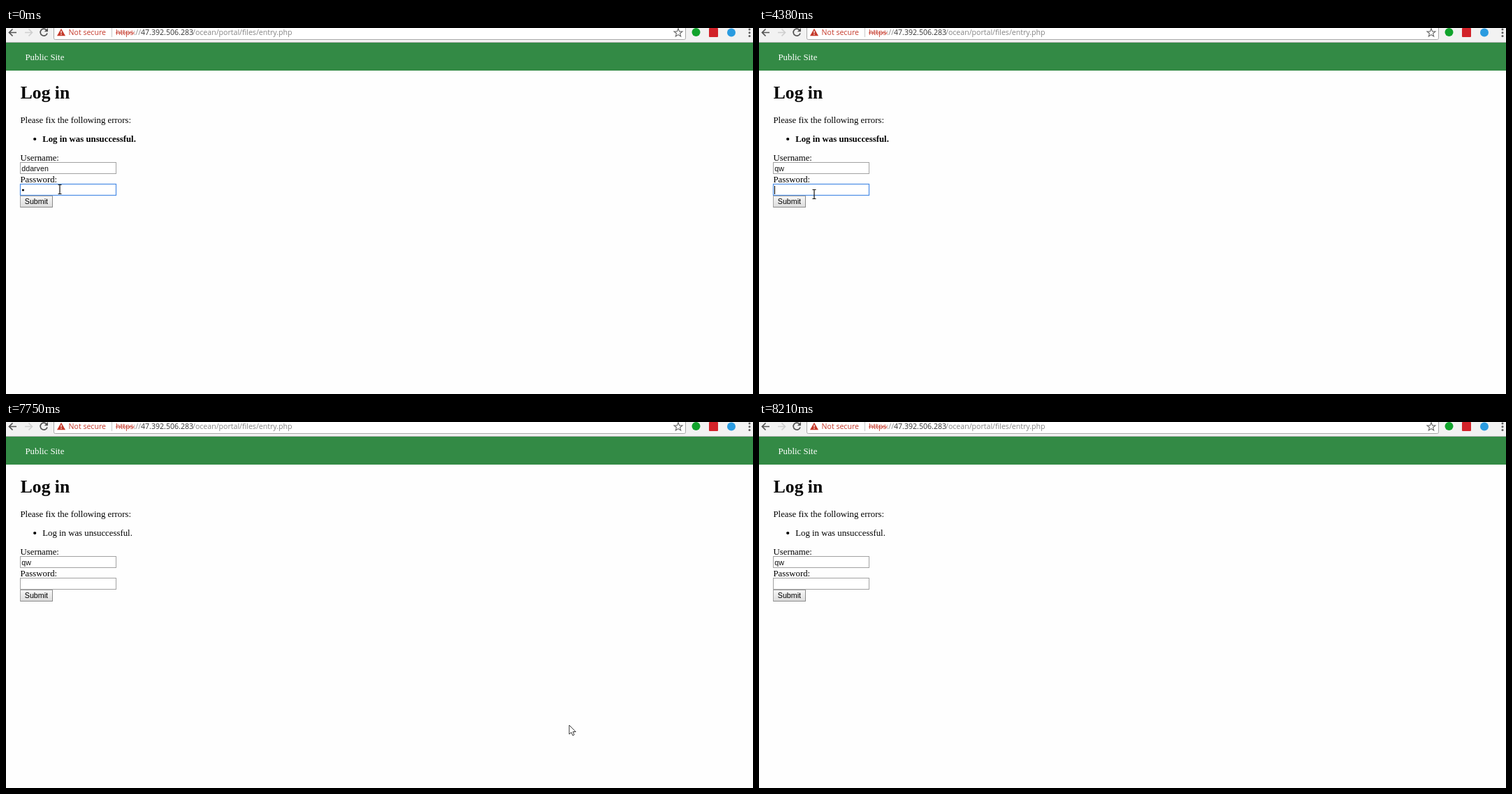
Animation, 1069 px wide and 524 px high, one loop 8.74 s. Source, as an HTML page:

```html
<!DOCTYPE html>
<html lang="en">
<head>
<meta charset="utf-8">
<title>Log in</title>
<style>
  html, body { margin: 0; width: 100%; height: 100%; overflow: hidden; background: #fefefe; }
  svg { display: block; width: 1069px; height: 524px; overflow: hidden; }
  text { white-space: pre; }
  .ui { font: 10.6px "Open Sans", "Noto Sans", sans-serif; }
  .page { font: 12.8px "Liberation Serif", "Times New Roman", serif; }
  .field { font: 10.67px "Liberation Sans", Arial, sans-serif; }
  .label { font: 8.7px "Open Sans", "Noto Sans CJK SC", "Noto Sans CJK", sans-serif; fill: #fff;
    text-anchor: middle; paint-order: stroke; stroke: rgba(25, 30, 20, .85); stroke-width: 1.8px; }
  .line { fill: none; }
  .box { fill: #fff; stroke: #a2a2a2; }
  .box.focus { stroke: #4f8fe6; stroke-width: 1.25; }
</style>
</head>
<body>
<svg viewBox="0 0 1069 524">
  <defs>
    <linearGradient id="face" x2="0" y2="1">
      <stop stop-color="#f7f7f7"/><stop offset="1" stop-color="#dcdcdc"/>
    </linearGradient>
    <linearGradient id="band">
      <stop stop-color="#bace28"/><stop offset=".6" stop-color="#bace38"/><stop offset="1" stop-color="#b2cc70"/>
    </linearGradient>
  </defs>

  <g id="desktop" visibility="hidden">
    <rect width="1069" height="524" fill="#e7e28e"/>
    <path d="M0 120Q130 85 330 108T626 60V0H1069V350Q840 380 640 350T160 385Q60 400 0 380Z" fill="#ebe49f"/>
    <rect y="21" width="1069" height="40" fill="url(#band)"/>
    <path d="M0 425Q160 448 330 430T640 415L850 360L1069 390V524H0Z" fill="#c9df7c"/>
    <path d="M0 468Q300 450 560 458T830 392Q960 370 1069 410V524H0Z" fill="#b2da55"/>
    <path d="M905 524Q950 430 1069 405V524Z" fill="#9dd43a"/>
    <path d="M845 40Q800 120 812 210T818 325Q850 240 868 130Z" fill="#cede66"/>
    <path d="M660 225Q610 245 600 285Q612 330 650 335Z" fill="#c3da64"/>
    <g id="leaves"></g>
    <rect x=".5" y="-6" width="625.5" height="491.5" rx="3" fill="rgba(255,255,230,.06)" stroke="#94926a" stroke-width="1.8"/>
    <g id="icons"></g>
  </g>

  <g id="window">
    <rect width="1069" height="524" fill="#fefefe"/>
    <rect width="1069" height="20" fill="#f2f2f2"/>
    <path d="M0 20.5H1069" stroke="#b9b9b9"/>
    <rect x="68.5" y="-8" width="904" height="24.5" rx="2" fill="#fff" stroke="#a9a9a9"/>
    <g class="line" stroke-width="1.7">
      <path d="M15 6.5H5M9.5 1.5L4.5 6.5L9.5 11.5" stroke="#555"/>
      <path d="M27 6.5H37M32.5 1.5L37.5 6.5L32.5 11.5" stroke="#cfcfcf"/>
      <g id="reload"><path d="M58.2 3.2A5 5 0 1 0 59 7.5" stroke="#555"/><path d="M60 0V5.2H54.8Z" fill="#555"/></g>
      <path id="stop" d="M50 2.5L58 10.5M58 2.5L50 10.5" stroke="#555"/>
    </g>
    <path d="M79 .8L85 11.2H73Z" fill="#c5392a"/>
    <path d="M79 4V7.6M79 8.6V10" stroke="#fff" stroke-width="1.2"/>
    <path d="M151.5 0V13" stroke="#c8c8c8"/>
    <g class="ui">
      <text x="89.5" y="10.3" fill="#c5392a">Not secure</text>
      <text x="157" y="10.3" fill="#c5392a">https</text>
      <text x="182.5" y="10.3" fill="#888">://</text>
      <text x="193" y="10.3" fill="#333">47.392.506.283</text>
      <text x="267" y="10.3" fill="#858585">/ocean/portal/files/entry.php</text>
    </g>
    <path d="M157 7H184" stroke="#c5392a"/>
    <path d="M962 .8L963.6 4.9L968 5.1L964.6 7.8L965.7 12L962 9.6L958.3 12L959.4 7.8L956 5.1L960.4 4.9Z"
      class="line" stroke="#666" stroke-width="1.1"/>
    <circle cx="987.5" cy="6" r="6" fill="#11a32c"/>
    <rect x="1006" y="0" width="13" height="13" rx="1" fill="#d2232a"/>
    <circle cx="1038" cy="6.5" r="6" fill="#2a9be0"/>
    <g fill="#5a5a5a"><circle cx="1064" cy="2" r="1.5"/><circle cx="1064" cy="6.7" r="1.5"/><circle cx="1064" cy="11.4" r="1.5"/></g>

    <rect y="21" width="1069" height="40" fill="#338a45"/>
    <g class="page">
      <text x="27.5" y="46" fill="#fff">Public Site</text>
      <text x="20.8" y="101" style="font-size:25.6px;font-weight:bold">Log in</text>
      <text x="20.5" y="136">Please fix the following errors:</text>
      <circle cx="41.2" cy="159" r="2.1"/>
      <text id="error" x="52.2" y="163">Log in was unsuccessful.</text>
      <text x="20.5" y="190">Username:</text>
      <text x="20.5" y="221">Password:</text>
    </g>
    <rect id="user" class="box" x="20.5" y="192.5" width="137" height="16"/>
    <rect id="pass" class="box" x="20.5" y="223.5" width="137" height="16"/>
    <rect id="mark" x="22" y="195" width="39" height="12" fill="#3390ff"/>
    <text id="name" class="field" x="22.3" y="204.6"></text>
    <circle id="dot" cx="24.4" cy="232" r="1.6"/>
    <path id="caret" stroke="#000"/>
    <rect id="button" x="20.5" y="240.5" width="46" height="16" fill="url(#face)" stroke="#a3a3a3"/>
    <path d="M20.5 256.5H66.5V240.5" class="line" stroke="#8a8a8a"/>
    <text class="field" x="26.8" y="252.3">Submit</text>
  </g>

  <path id="arrow" d="M0 0V13L3 10.3L5 14.8L7.2 13.8L5.3 9.5H9.3Z" fill="#fff" stroke="#222" stroke-width=".9"/>
  <path id="beam" d="M-2.5 -6.5H-.6L0 -6L.6 -6.5H2.5M0 -6V6M-2.5 6.5H-.6L0 6L.6 6.5H2.5" class="line" stroke="#111" stroke-width="1.2"/>
</svg>

<script>
const LOOP = 8740;
const $ = id => document.getElementById(id);
const show = (id, on) => $(id).setAttribute('visibility', on ? 'visible' : 'hidden');

// --- Wallpaper leaves: a midrib with a half-width on each side ---
function leaf(top, bottom, rib, left, right, fill) {
  const at = u => top + u * (bottom - top);
  const edge = (u, side) => rib(u) + (side < 0 ? -left(u) : right(u));
  const a = [], b = [];
  for (let i = 0; i <= 60; i++) {
    const u = i / 60, tooth = i % 4 * 1.5;
    a.push(`${edge(u, -1) - tooth} ${at(u)}`);
    b.unshift(`${edge(u, 1) + tooth} ${at(u)}`);
  }
  let out = `<path d="M${a.concat(b).join('L')}Z" fill="${fill}" stroke="#acd93c" stroke-width="4"/>`;
  for (let u = 0.1; u < 0.92; u += 0.042) {
    for (const side of [-1, 1]) {
      const end = Math.min(1, u + 0.12);
      const x0 = rib(u), x1 = x0 + (edge(end, side) - x0) * 0.78;
      const curve = `M${x0} ${at(u)}Q${(x0 + x1) / 2 + side * 12} ${at(u) - 2} ${x1} ${at(end)}`;
      const back = `Q${(x0 + x1) / 2} ${at(u) + 14} ${x0} ${at(u) + 13}Z`;
      out += `<path d="${curve}${back}" fill="#3f8a10" opacity="${0.12 + 0.5 * u}"/>
        <path d="${curve}" class="line" stroke="#a2d03c" stroke-width="1.6"/>`;
    }
  }
  const spine = Array.from({length: 21}, (_, i) => `${rib(i / 20)} ${at(i / 20)}`);
  return out + `<path d="M${spine.join('L')}" class="line" stroke="#b5dc5c" stroke-width="3"/>`;
}

$('leaves').innerHTML =
  leaf(0, 530, u => 729 + 72 * u ** 3, u => 32 * (1 - u) + 88 * Math.sin(Math.PI * u * u), u => 47 - 40 * u ** 3, '#7fbf1c') +
  leaf(-6, 475, u => 908 + 12 * Math.sin(Math.PI * u) - 8 * u,
    u => (52 + 28 * u) * Math.sqrt(1 - u ** 8), u => (95 - 55 * u) * Math.sqrt(1 - u ** 6), '#84c41e');

// --- Desktop icons: column, row, kind, colour, label ---
const ICONS = `0,0,s,#6b7c90,Delvo x32|0,1,s,#f0773a,Doc Viewer|0,2,c,#f08a3c,文件助理|0,3,s,#5a3f86,notch
0,4,s,#2489d8,Video Set/Control...|0,5,c,#2aa6e6,Distant/Traveler|0,6,c,#463f78,horizon|0,7,c,#4fb84a,云朵浏览器
1,0,s,#8f9aa5,scheme|1,1,s,#2f8ae6,Tunelo|1,2,c,#f4f4ee,Plaza|1,3,c,#a5d65a,chitter
1,4,c,#2d2d33,闲聊室|1,5,c,#d98634,scripto|1,6,s,#dd7d6c,Dev Shell|1,7,s,#3fb6c8,software
2,0,s,#5fae4c,电脑安全卫士|2,1,c,#e0574a,Meadow/Window|2,2,s,#3a5580,Guest PC/EmulateBox|2,3,s,#ee6a40,ProbeTool...
2,4,s,#ea3f42,每日双语词/典|2,5,b,#e9f1f3,Recycle Bin|2,6,t,#5560b8,remoto|2,7,t,#d9dcdc,ScreenRec
3,0,s,#c25a5a,Nova2_7|3,1,s,#2478c4,Simple Script/Editor
5,2,d,#ee7a32,Garden/Layout Over...|6,2,d,#6cbf3a,answer|7,2,f,#ee8a5a,51700|8,2,f,#ee8a5a,51800
9,2,d,#78b83c,project/draft...|10,2,d,#78b83c,lab exercise/group list|11,2,f,#f8f8ee,Samples|12,2,f,#55564a,before 2018/spring
13,2,d,#2f74c0,Resume/Copy|5,3,d,#ee7a32,ResumeCop...|6,3,d,#78b83c,note|7,3,f,#f8f8ee,course notes
9,3,f,#a58a5c,Talks|11,3,f,#ecd98a,FinalProject`;

const SHAPES = {
  s: c => `<rect x="-15.5" y="-16" width="31" height="31" rx="4" fill="${c}"/>`,
  c: c => `<circle r="15.5" fill="${c}"/>`,
  b: c => `<path d="M-11 -12L0 -15L12 -11L8 14L-7 15Z" fill="${c}" stroke="#9fb4ba"/>`,
  t: c => `<rect x="-15" y="-12" width="30" height="20" fill="${c}" stroke="#555"/><path d="M-7 13H7M0 8V13" stroke="#555" stroke-width="2"/>`,
  d: c => `<path d="M-12 -16H8L13 -11V15H-12Z" fill="#fbfbf4" stroke="#b9b9a5"/><rect x="-15" y="-14" width="17" height="16" fill="${c}"/>`,
  f: c => `<path d="M-7 -12H3V14L-7 11Z" fill="#efe2ab"/><path d="M-3 -10H10V11L3 14V-8Z" fill="#f9f4d8"/><rect x="-4" y="-7" width="7" height="16" fill="${c}"/>`
};
const badge = '<path d="M-15 5H-6V14H-15Z" fill="#fff"/><path d="M-13 12.5L-8 7.5M-11.5 7H-7.6V11" class="line" stroke="#2b6fb5" stroke-width="1.5"/>';

$('icons').innerHTML = ICONS.split(/[|\n]/).map(row => {
  const [col, line, kind, colour, label] = row.split(',');
  const lines = label.split('/').map((s, i) => `<text class="label" y="${28 + i * 12}">${s}</text>`).join('');
  return `<g transform="translate(${24.3 + col * 59.45} ${-9 + line * 71.3})">${SHAPES[kind](colour)}${+col < 4 && kind !== 'b' ? badge : ''}${lines}</g>`;
}).join('') + '<circle cx="33" cy="122" r="7.5" fill="#e8403a"/><text class="label" x="33" y="125" style="stroke:none;font-size:8px">39</text>';

// --- Pointer: time, x, y, shape ---
const POINTER = [
  [0, 77, 231, 'beam'], [520, 82, 238, 'beam'], [890, 92, 241, 'arrow'], [1020, 104, 241, 'arrow'],
  [1160, 109, 240, 'arrow'], [1970, 107, 231, 'beam'], [2100, 100, 216, 'beam'], [2250, 85, 203, 'beam'],
  [2400, 62, 202, 'beam'], [2550, 30, 202, 'beam'], [2700, 4, 203, 'beam'], [2850, 30, 212, 'beam'],
  [3000, 63, 218, 'beam'], [3150, 66, 218, 'beam'], [3420, 77, 222, 'beam'], [3550, 79, 224, 'beam'],
  [3830, 80, 230, 'beam'], [3970, 80, 235, 'beam'], [4100, 79, 238, 'beam'], [4970, 74, 240, 'arrow'],
  [5110, 68, 243, 'arrow'], [5250, 64, 244, 'arrow'], [5520, 95, 265, 'arrow'], [5660, 164, 307, 'arrow'],
  [5800, 140, 303, 'arrow'], [5950, 125, 298, 'arrow'], [7170, 150, 310, 'arrow'], [7310, 300, 345, 'arrow'],
  [7450, 500, 385, 'arrow'], [7600, 690, 415, 'arrow'], [7750, 806, 434, 'arrow'], [7900, 0, 0, '']
];

// --- Page: each step changes part of the state ---
const STEPS = [
  [0, {name: 'ddarven', focus: 'pass', dot: 1, bold: 1, alpha: 1, caret: '', load: 0, mark: 0, press: 0}],
  [890, {caret: 'M26.5 226V238'}], [1430, {caret: ''}], [1580, {load: 1}],
  [2100, {load: 0, dot: 0, focus: ''}], [2400, {focus: 'user'}],
  [2550, {mark: 31}], [2700, {mark: 39}],
  [3420, {mark: 0, name: 'qw', caret: 'M36.5 196V207'}],
  [3830, {caret: ''}], [4100, {focus: 'pass', caret: 'M22.5 226V238'}],
  [4660, {dot: 1, caret: 'M26.5 226V238'}],
  [4970, {caret: ''}], [5250, {focus: '', press: 1}], [5520, {press: 0}],
  [6100, {load: 1}], [6650, {load: 0, dot: 0, bold: 0}],
  [7900, {alpha: 0.56}], [8060, {alpha: 0.42}], [8210, {alpha: 1}]
];

function draw(t) {
  const s = Object.assign({}, ...STEPS.filter(step => step[0] <= t).map(step => step[1]));
  const [, x, y, shape] = POINTER.filter(step => step[0] <= t).pop();

  $('window').setAttribute('opacity', s.alpha);
  show('desktop', s.alpha < 1);
  show('reload', !s.load);
  show('stop', s.load);
  show('dot', s.dot);
  for (const id of ['user', 'pass']) $(id).classList.toggle('focus', s.focus === id);
  $('error').setAttribute('font-weight', s.bold ? 'bold' : 'normal');
  $('name').textContent = s.name;
  $('name').setAttribute('fill', s.mark ? '#fff' : '#111');
  $('mark').setAttribute('x', 61 - s.mark);
  $('mark').setAttribute('width', s.mark);
  $('caret').setAttribute('d', s.caret);
  $('button').setAttribute('fill', s.press ? '#dedede' : 'url(#face)');

  for (const id of ['arrow', 'beam']) {
    show(id, shape === id);
    $(id).setAttribute('transform', `translate(${x} ${y})`);
  }
}

const start = performance.now();
function tick() {
  draw((performance.now() - start) % LOOP);
  requestAnimationFrame(tick);
}
tick();
</script>
</body>
</html>
```
